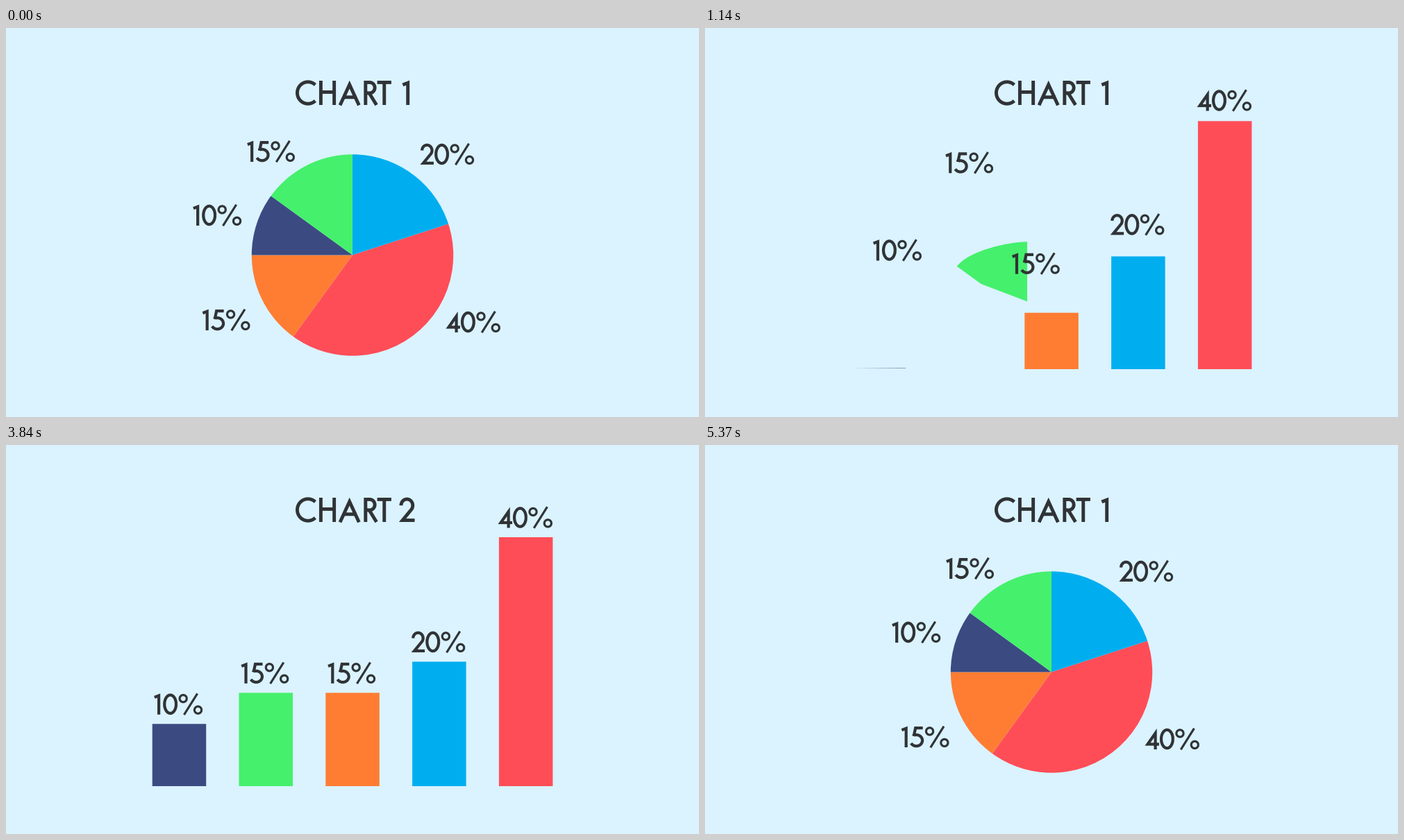
Animation, 998 px wide and 561 px high, one loop 5400 ms. Source, as a matplotlib script:

```python
import numpy as np
import matplotlib.pyplot as plt
from matplotlib.animation import FuncAnimation
from matplotlib.patches import PathPatch
from matplotlib.path import Path

W, H, DPI = 998, 561, 100
PX = 72 / DPI
FRAMES, INTERVAL = 180, 30
BG, INK = "#daf3ff", "#303336"

CENTER, RADIUS = np.array([499, 327.5]), 145.2
BASE, BAR_W, BAR_STEP, BAR_LEFT = 492, 77.5, 124.8, 210.7
UNIT = 8.975  # bar height per percent

# Clockwise from the top: color, percent, centre of the label on the pie
SLICES = [
    ("#00aef0", 20, (635.7, 182)),
    ("#ff4d57", 40, (672.6, 424)),
    ("#ff7d33", 15, (317.4, 421)),
    ("#3c4a82", 10, (304.5, 270)),
    ("#45f06d", 15, (381.9, 178)),
]
LEAVE_RANK = (1, 0, 2, 3, 4)  # the largest slice leaves first, and returns last

TURN = 90                     # the way back runs in the second half
TITLE_2, TITLE_1 = 48, 138
LABEL_GLIDE = 22


def arc(cx, cy, rx, ry, a, b):
    t = np.radians(np.linspace(a, b, 40))
    return list(zip(cx + rx * np.cos(t), cy + ry * np.sin(t)))


def ring(cx, cy, rx, ry):
    return arc(cx, cy, rx, ry, 0, 360)


# Centre lines on a cap height of 100, with the advance of each letter
GLYPHS = {
    "C": (97, [arc(51, 50, 44, 45, 47, 313)]),
    "H": (78, [[(7, 0), (7, 100)], [(62, 0), (62, 100)], [(7, 53), (62, 53)]]),
    "A": (106, [[(8, -1), (47, 84), (86, -1)], [(20, 32), (74, 32)]]),
    "R": (55, [[(7, 0), (7, 93), (24, 93)] + arc(24, 71, 21, 22, 90, -90) + [(7, 49)],
               [(22, 49), (52, 0)]]),
    "T": (58, [[(0, 93), (58, 93)], [(29, 0), (29, 93)]]),
    "1": (42, [[(1, 83), (22, 91), (22, 0)]]),
    "2": (67, [arc(31, 68, 24, 26, 180, -38) + [(13, 7), (63, 7)]]),
    "4": (73, [[(52, 0), (52, 78), (15, 25), (70, 25)]]),
    "5": (70, [[(60, 93), (25, 93), (17, 55)] + arc(29, 33, 29, 27, 114, -150)]),
    "0": (74, [ring(35, 50, 28, 44)]),
    "%": (117, [ring(23, 77, 17, 17), ring(94, 22, 17, 17), [(27, -1), (91, 101)]]),
}


class Label:
    """Stroked lettering that can be moved by its baseline start."""

    def __init__(self, ax, text, size, pos=(0, 0)):
        self.size, self.width, self.parts = size, 0, []
        for ch in text:
            advance, strokes = GLYPHS[ch]
            scale = np.array([size, -size]) / 100
            paths = [Path(np.array(s) * scale + (self.width, 0)) for s in strokes]
            path = Path.make_compound_path(*paths)
            weight = size * (0.105 if ch == "%" else 0.14)
            patch = PathPatch(path, fill=False, ec=INK, lw=weight * PX, zorder=3,
                              capstyle="butt", joinstyle="miter", snap=False)
            ax.add_patch(patch)
            self.parts.append((patch, path))
            self.width += advance * size / 100
        self.move(pos)

    def move(self, pos):
        for patch, path in self.parts:
            patch.set_path(Path(path.vertices + np.array(pos), path.codes))

    def center(self, pos):
        self.move(pos + np.array([-self.width, self.size]) / 2)

    def show(self, on):
        for patch, _ in self.parts:
            patch.set_visible(on)


def rim(turn):
    a = 2 * np.pi * turn
    return CENTER + RADIUS * np.array([np.sin(a), -np.cos(a)])


def tangent(turn):
    a = 2 * np.pi * turn
    return RADIUS * np.array([np.cos(a), np.sin(a)])


class Slice:
    """A pie slice that folds flat onto the base line and grows into a bar."""

    def __init__(self, ax, color, percent, first, left):
        last = first + percent / 100
        right = left + BAR_W
        quarters = [q for q in (0.75, 0.5, 0.25) if first + 1e-6 < q < last - 1e-6]
        # A long rim has points to spare, so its side needs no extra corner
        corner = rim(first) if quarters else (rim(first) + CENTER) / 2
        pie = [rim(first), corner, CENTER, rim(last)]
        xs = [left, left, right, right]
        top = [1, 0, 0, 1]
        stops = [last] + quarters + [first]
        for a, b in zip(stops, stops[1:]):
            k = 4 / 3 * np.tan((b - a) * np.pi / 2)
            pie += [rim(a) + k * tangent(a), rim(b) - k * tangent(b), rim(b)]
            xs += [xs[-1], left, left]
            top += [1, 1, 1]
        self.pie = np.array(pie)
        self.flat = np.array([(x, BASE) for x in xs])
        self.rise = np.array([(0, -t * percent * UNIT) for t in top])
        self.codes = [Path.MOVETO] + [Path.LINETO] * 3 + [Path.CURVE4] * (len(pie) - 4)
        self.patch = PathPatch(Path(self.pie, self.codes), fc=color, lw=0, snap=False)
        ax.add_patch(self.patch)

    def pose(self, fold, grow):
        pts = self.pie + (self.flat - self.pie) * fold + self.rise * grow
        self.patch.set_path(Path(pts, self.codes))


def ease_in(x, power):
    return np.clip(x, 0, 1) ** power


def ease_out(x, power):
    return 1 - ease_in(1 - x, power)


def ease_both(x):
    x = np.clip(x, 0, 1)
    return 4 * x**3 if x < 0.5 else 1 - 4 * (1 - x) ** 3


def shape_state(i, rank):
    """How far a slice is folded flat, and how far its bar has grown."""
    if i < TURN:
        t = i - 15.65 - 3.66 * rank
        return ease_in(t / 11.4, 2.3), ease_out((t - 11.4) / 12.5, 2.7)
    t = i - 127.9 - 3.6 * (4 - rank)
    return 1 - ease_out((t - 9.5) / 14, 2.3), 1 - ease_in(t / 9.5, 6)


def label_state(i, rank):
    if i < TURN:
        return ease_both((i - 14.2 - 4.3 * rank) / LABEL_GLIDE)
    return 1 - ease_both((i - 129 - 3.8 * (4 - rank)) / LABEL_GLIDE)


fig = plt.figure(figsize=(W / DPI, H / DPI), dpi=DPI, facecolor=BG)
ax = fig.add_axes([0, 0, 1, 1])
ax.set_xlim(0, W)
ax.set_ylim(H, 0)
ax.axis("off")

Label(ax, "CHART", 35, (417, 111))
digit_1 = Label(ax, "1", 35, (571, 111))
digit_2 = Label(ax, "2", 35, (566.5, 111))

# Bars stand in rising order
by_size = sorted(range(len(SLICES)), key=lambda n: (SLICES[n][1], -n))
parts, first = [], 0
for n, (color, percent, on_pie) in enumerate(SLICES):
    left = BAR_LEFT + BAR_STEP * by_size.index(n)
    on_bar = np.array([left + BAR_W / 2 - 1, BASE - percent * UNIT - 28.5])
    parts.append((Slice(ax, color, percent, first, left),
                  Label(ax, f"{percent}%", 30),
                  np.array(on_pie), on_bar, LEAVE_RANK[n]))
    first += percent / 100


def draw(i):
    second = TITLE_2 <= i < TITLE_1
    digit_1.show(not second)
    digit_2.show(second)
    for piece, label, on_pie, on_bar, rank in parts:
        piece.pose(*shape_state(i, rank))
        label.center(on_pie + (on_bar - on_pie) * label_state(i, rank))
    return []


anim = FuncAnimation(fig, draw, frames=FRAMES, interval=INTERVAL,
                     repeat=True, repeat_delay=0, cache_frame_data=False)
plt.show()
```
